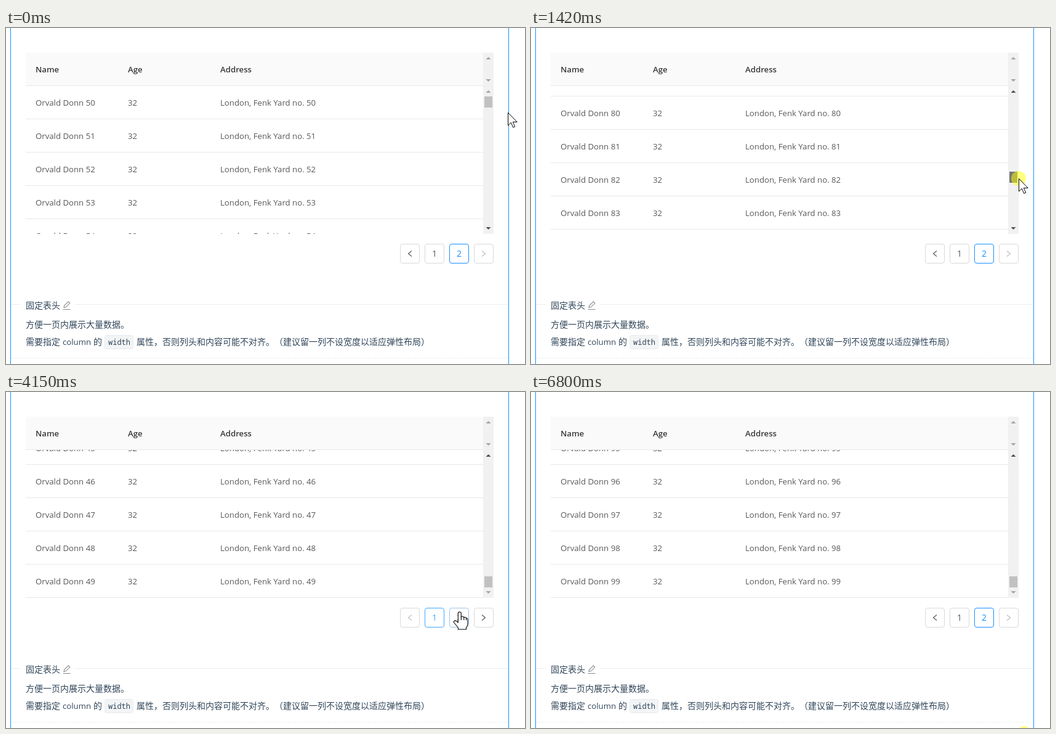
These frames come from a looping animation (843 px wide and 545 px high, 7180 ms). An HTML page:

```html
<!DOCTYPE html>
<html lang="zh-CN">
<head>
<meta charset="utf-8">
<title>固定表头</title>
<style>
  html, body { margin: 0; width: 100%; height: 100%; overflow: hidden; background: #fff; }
  svg { display: block; width: 843px; height: 545px; }
  text { font: 13.2px "Open Sans", "Noto Sans", sans-serif; fill: #595959; white-space: pre; }
  .head text { font-weight: 600; fill: #383838; }
  .doc text { font-family: "Open Sans", "Noto Sans CJK SC", "Noto Sans CJK", sans-serif; fill: #314659; }
  .doc .zh { font-size: 14px; font-family: "Noto Sans CJK SC", "Noto Sans CJK", sans-serif; text-spacing-trim: space-all; }
  .doc .code { font: 12px "Noto Sans Mono", monospace; }
  .crisp { shape-rendering: crispEdges; }
  .pager rect { fill: #fff; stroke: #d9d9d9; }
  .pager text { text-anchor: middle; font-size: 14px; }
  .pager path { fill: none; stroke-width: 1.2; }
  .cursor { fill: #fff; stroke: #000; stroke-linejoin: round; }
</style>
</head>
<body>
<svg viewBox="0 0 843 545">
  <defs>
    <clipPath id="body"><rect x="32" y="94" width="743" height="240"/></clipPath>
    <path id="up" d="M-4 2L0 -2L4 2Z"/>
    <path id="down" d="M-4 -2L0 2L4 -2Z"/>
  </defs>

  <g class="crisp">
    <rect x="7" width="1" height="545" fill="#1890ff"/>
    <rect x="816" width="1" height="545" fill="#1890ff"/>
    <rect x="32" y="40" width="743" height="53" fill="#fafafa"/>
    <rect x="32" y="93" width="743" height="1" fill="#e8e8e8"/>
    <rect x="775" y="40" width="17" height="294" fill="#f1f1f1"/>
    <path d="M8 448.5H24M112 448.5H816" stroke="#ebedf0"/>
    <path d="M8 535.5H816" stroke="#ebedf0" stroke-dasharray="3 2"/>
  </g>

  <g class="head">
    <text x="48" y="72">Name</text>
    <text x="198" y="72">Age</text>
    <text x="348" y="72">Address</text>
  </g>
  <g id="rows" clip-path="url(#body)"></g>

  <g fill="#a3a3a3">
    <use href="#up" x="783.5" y="49"/>
    <use href="#down" x="783.5" y="85"/>
    <use id="barUp" href="#up" x="783.5" y="103"/>
    <use id="barDown" href="#down" x="783.5" y="325"/>
  </g>
  <rect id="thumb" class="crisp" x="777" width="13" height="18"/>

  <g class="pager">
    <rect x="640.5" y="350.5" width="31" height="31" rx="3.5"/>
    <path id="prev" d="M659 361.5L653.5 366L659 370.5"/>
    <rect id="box1" x="680.5" y="350.5" width="31" height="31" rx="3.5"/>
    <text id="num1" x="696" y="371">1</text>
    <rect id="box2" x="720.5" y="350.5" width="31" height="31" rx="3.5"/>
    <text id="num2" x="736" y="371">2</text>
    <rect x="760.5" y="350.5" width="31" height="31" rx="3.5"/>
    <path id="next" d="M773 361.5L778.5 366L773 370.5"/>
  </g>

  <g class="doc">
    <text class="zh" x="32" y="455">固定表头</text>
    <path d="M92.5 456.5H104.5M94 453.5L94.7 450.3L101.3 443.8L103.8 446.3L97.2 452.8Z" fill="none" stroke="#8c8c8c" stroke-width="1.1"/>
    <text class="zh" x="32" y="486">方便一页内展示大量数据。</text>
    <text class="zh" x="32" y="514">需要指定</text>
    <text x="92" y="514">column</text>
    <text class="zh" x="142" y="514">的</text>
    <rect x="160.5" y="498.5" width="46" height="22" rx="3" fill="#f2f4f5" stroke="#e9ebed"/>
    <text class="code" x="166" y="514">width</text>
    <text class="zh" x="212" y="514">属性，否则列头和内容可能不对齐。</text>
    <text class="zh" x="436" y="514">（</text>
    <text class="zh" x="450" y="514">建议留一列不设宽度以适应弹性布局）</text>
  </g>

  <circle id="press" r="12" fill="#ff0" fill-opacity=".5"/>
  <g id="pointer" class="cursor">
    <path id="arrow" d="M.5 .5V21L5.3 16.4L8.7 24.3L11.7 23L8.3 15.5H15.2Z"/>
    <g id="hand" stroke-width="1.1">
      <path d="M-2.7 17V2.2a2.5 2.4 0 0 1 5 0V8q.6-1.200 2.400-1 2 .3 2.100 2 .5-1 2-.7 1.700.4 1.700 2 .5-.8 1.500-.3 1 .5 1 2V19q0 3-2.500 6V28H-2.700V25Q-5.500 21.500-9 17.500-10.500 15-8.500 14-6.500 13.300-4.500 15.500Z"/>
      <path d="M2.300 8v5M6.800 9v4M10.500 10.300v3" fill="none"/>
    </g>
    <g id="blocked" fill="none" stroke="#000" stroke-width="2.5">
      <circle r="8.5"/>
      <path d="M-6 -6L6 6"/>
    </g>
  </g>
</svg>

<script>
const LOOP = 7180, ROW = 54, MAX_SCROLL = 2460, TRACK = 188;
const $ = id => document.getElementById(id);

// Bursts of movement: start, end, number of picture changes
const bursts = [
  [380, 780, 10], [960, 1650, 16], [1700, 2310, 12], [2440, 2720, 6],
  [3130, 3640, 11], [3820, 4490, 15], [4540, 4570, 2], [4770, 5230, 11],
  [5540, 5970, 10], [6800, 6800, 1]
];

// Pointer tip: time, x, y
const path = [
  [380, 815, 137], [780, 788, 122], [960, 788, 122], [1098, 789, 145],
  [1236, 790, 178.94], [1604, 793, 310], [1700, 793, 312],
  [1960, 745, 334], [2200, 697, 361], [2310, 694, 363], [3130, 694, 363],
  [3400, 735, 338], [3640, 786, 318], [3820, 786, 318], [4130, 737, 357],
  [4240, 737, 359], [4770, 737, 359], [5000, 757, 336], [5230, 781, 313],
  [5500, 781, 313], [5540, 781, 323], [5683, 782, 366], [5922, 793, 535], [5970, 801, 554]
];

const GREY = [89, 89, 89], FAINT = [191, 191, 191], LINE = [217, 217, 217];
const BLUE = [24, 144, 255], LIGHT = [64, 169, 255];
const fades = (...keys) => keys.map(([time, color]) => [time, ...color]);
const first = off => fades([2020, off], [2310, LIGHT], [4290, LIGHT], [4570, off]);
const second = off => fades([2440, BLUE], [2720, off], [4060, off], [4300, LIGHT], [6799, LIGHT], [6800, BLUE]);
const toggle = (a, b) => fades([2440, a], [2720, b], [4290, b], [4570, a]);
const colors = {
  box1: ["stroke", first(LINE)], num1: ["fill", first(GREY)],
  box2: ["stroke", second(LINE)], num2: ["fill", second(GREY)],
  prev: ["stroke", toggle(GREY, FAINT)], next: ["stroke", toggle(FAINT, GREY)]
};

function at(keys, time) {
  const i = keys.findIndex(key => key[0] > time);
  if (i < 0) return keys.at(-1).slice(1);
  if (i === 0) return keys[0].slice(1);
  const a = keys[i - 1], b = keys[i], k = (time - a[0]) / (b[0] - a[0]);
  return a.slice(1).map((v, j) => v + (b[j + 1] - v) * k);
}

function stepped(time) {
  const burst = bursts.findLast(b => b[0] <= time);
  if (!burst) return 0;
  const [start, end, count] = burst;
  if (time >= end) return end;
  const step = (end - start) / (count - 1);
  return start + Math.floor((time - start) / step + 0.1) * step;
}

const within = (time, a, b) => time >= a && time < b;
const inside = (x, y, left, top, w, h) => within(x, left, left + w) && within(y, top, top + h);
const show = (id, on) => $(id).setAttribute("visibility", on ? "visible" : "hidden");
const move = (id, x, y) => $(id).setAttribute("transform", `translate(${x} ${y})`);

$("rows").innerHTML = `<g><text x="48" y="126"></text><text x="198" y="126">32</text>
  <text x="348" y="126"></text><rect class="crisp" x="32" y="147" width="743" height="1" fill="#e8e8e8"/></g>`.repeat(6);
const rows = [...$("rows").children];

function drawRows(scroll, base) {
  const top = Math.floor(scroll / ROW);
  rows.forEach((row, i) => {
    const n = top + i;
    row.setAttribute("transform", `translate(0 ${n * ROW - scroll})`);
    row.setAttribute("visibility", n < 50 ? "visible" : "hidden");
    row.children[0].textContent = `Orvald Donn ${base + n}`;
    row.children[2].textContent = `London, Fenk Yard no. ${base + n}`;
  });
}

function draw(now) {
  const real = now % LOOP, time = stepped(real);
  const [px, py] = at(path, time), x = Math.round(px), y = Math.round(py);
  const firstPage = within(real, 2440, 4290);
  const dragging = within(real, 960, 1700);
  const dragged = time < 960 ? 0 : time < 1650 ? Math.min(py - 122, TRACK) : TRACK;
  const scroll = Math.round(dragged / TRACK * MAX_SCROLL);
  const thumbY = 111 + Math.floor(dragged);

  drawRows(scroll, firstPage ? 0 : 50);
  $("thumb").setAttribute("y", thumbY);
  $("thumb").setAttribute("fill", dragging ? "#787878"
    : inside(x, y, 777, thumbY, 13, 18) ? "#a8a8a8" : "#c1c1c1");
  $("barUp").setAttribute("fill", scroll > 0 ? "#505050" : "#a3a3a3");
  $("barDown").setAttribute("fill", scroll < MAX_SCROLL ? "#505050" : "#a3a3a3");

  for (const [id, [property, keys]] of Object.entries(colors))
    $(id).style[property] = `rgb(${at(keys, time).map(Math.round)})`;

  const onNumber = inside(x, y, 680, 350, 32, 32) || inside(x, y, 720, 350, 32, 32);
  const onNext = inside(x, y, 760, 350, 32, 32);
  const hand = onNumber || (onNext && firstPage), blocked = onNext && !firstPage;
  show("hand", hand);
  show("blocked", blocked);
  show("arrow", !hand && !blocked);
  move("pointer", x, y);
  move("press", x, y);
  show("press", dragging || within(real, 2440, 2600) || within(real, 4290, 4400) || real >= 6800);
}

function tick() {
  draw(performance.now());
  requestAnimationFrame(tick);
}
tick();
</script>
</body>
</html>
```
